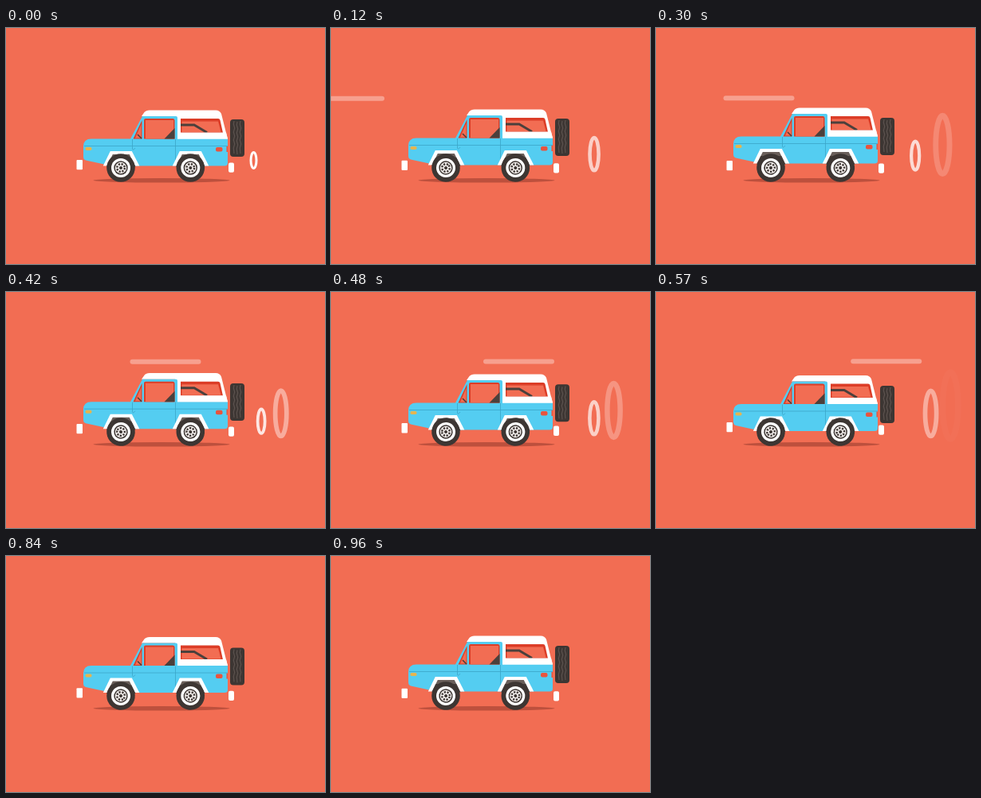
Write an HTML page that moves like this. It is 400x297 px and loops after 0.99 s.

```html
<!DOCTYPE html>
<html>
<head>
<meta charset="utf-8">
<style>
html, body { margin: 0; width: 100%; height: 100%; overflow: hidden; background: #f26d53; }
svg { display: block; width: 100vw; height: 100vh; }
</style>
</head>
<body>
<svg viewBox="0 0 400 297">
  <defs>
    <g id="arch">
      <path fill="#fff" d="M-22.500 173.500L-13.500 155H13.500L23 173.500Z"/>
      <path fill="#6a5f5a" d="M-18 174.500L-10.500 159H10.500L18 174.500Z"/>
      <path fill="#463c38" d="M-18 174.500L-13 164H13L18 174.500Z"/>
    </g>
    <g id="tyre">
      <circle r="17.800" fill="#3d3633"/>
      <circle r="12" fill="#fff"/>
      <circle r="8.700" fill="#3d3633"/>
      <circle r="7.200" fill="#f3efed"/>
      <circle r="4.800" fill="none" stroke="#3d3633" stroke-width="2.400" stroke-dasharray="2.200 1.570"/>
      <circle r="2" fill="#3d3633"/>
    </g>
  </defs>
  <rect width="400" height="297" fill="#f26d53"/>
  <rect id="streak" width="89" height="6" rx="3" fill="#fff" opacity=".35"/>
  <ellipse cx="195" cy="191.800" rx="85.500" ry="2.800" fill="#bd503d"/>
  <g id="rings" fill="none" stroke="#fff"></g>

  <g id="spare">
    <rect x="281" y="115" width="18" height="47" rx="4" fill="#3d3633"/>
    <g fill="none" stroke="#5d534f" stroke-width="1.200">
      <path id="tread" d="M286 117l-.7 4 1.400 5-1.400 5 1.400 5-1.400 5 1.400 5-1.400 5 .7 7"/>
      <use href="#tread" x="4" y="1"/>
      <use href="#tread" x="8"/>
    </g>
  </g>

  <g id="body">
    <path fill="#fff" d="M170 111L173.500 106Q175.500 103.400 180 103.400H263Q268 103.400 270 108L278 140H212V111Z"/>
    <path fill="#54cdf1" d="M97 149Q97 139.500 107 139.500H156L171 111H213Q215 111 215 113V139.500H278V170Q278 173.500 274 173.500H161L123 171.500 100 166.500Q97 165.500 97 162Z"/>
    <path fill="#dc3d27" d="M175 114H209Q211.500 114 211.500 116.500V139.500H173V116Q173 114 175 114ZM170.500 116V139.500H159.500ZM219 114H266Q268 114 268.500 116L272 132H219Z"/>
    <path fill="#f26d53" d="M175 116H210V139.500H175ZM169.500 121V138.500H162ZM220.500 117.500H266L269.500 131H220.500Z"/>
    <path fill="#4b403c" d="M198.500 139.500L211.500 126V139.500Z"/>
    <path fill="none" stroke="#4b403c" stroke-width="3" d="M219 122H236L252 131.500"/>
    <path fill="none" stroke="#4b3b38" stroke-width="1.500" d="M165 134L170 139"/>
    <path fill="#fff" d="M215 131.500H276L278 139.500H215Z"/>
    <path fill="none" stroke="#3ba5c8" stroke-width=".8" d="M98 148.500H278M158.500 140V152Q159 155 162 151M212.500 140V173"/>
    <rect x="99.500" y="150" width="8" height="4" rx="1.700" fill="#e5b550"/>
    <rect x="263" y="150" width="8.500" height="5.500" rx="2" fill="#e9543e"/>
    <rect x="276.500" y="149" width="1.500" height="7" fill="#e9543e"/>
    <use href="#arch" x="144.300"/>
    <use href="#arch" x="231.300"/>
  </g>

  <g id="bumpers" fill="#fff">
    <rect x="88.500" y="166" width="7.500" height="12.300" rx="1"/>
    <rect x="279" y="169.500" width="7" height="12.300" rx="2"/>
  </g>
  <use class="wheel" href="#tyre" data-x="144"/>
  <use class="wheel" href="#tyre" data-x="231.300"/>
</svg>
<script>
const LOOP = 990, STEP = 30;
const times = [0, 120, 300, 420, 570, 720, 960];
const bounce = {
  body: [0, -1, -3, -1.3, 1.5, 0, -3],
  spare: [0, -1, -2, 0, 3, 2.5, -2],
  bumpers: [0, 0.7, 1, 0, -2, -0.6, 0.8]
};
const ringStarts = [0, 210, 361];
const $ = id => document.getElementById(id);
const set = (el, attrs) => { for (const k in attrs) el.setAttribute(k, attrs[k]); };

const rings = ringStarts.map(() =>
  $('rings').appendChild(document.createElementNS('http://www.w3.org/2000/svg', 'ellipse')));

// Smooth curve through the key heights
function heightAt(keys, t) {
  const last = times.length - 1;
  let i = 0;
  while (i < last - 1 && t >= times[i + 1]) i++;
  const slope = k => {
    const a = Math.max(k - 1, 0), b = Math.min(k + 1, last);
    return (keys[b] - keys[a]) / (times[b] - times[a]);
  };
  const span = times[i + 1] - times[i], u = (t - times[i]) / span;
  const ease = u * u * (3 - 2 * u);
  return keys[i] + (keys[i + 1] - keys[i]) * ease
    + span * u * (1 - u) * ((1 - u) * slope(i) - u * slope(i + 1));
}

function drawRing(ring, age) {
  const d = age * 0.163, width = 3 + d * 0.08;
  const alive = age >= -20 && d < 60;
  set(ring, {
    cx: 310.5 + d, cy: 166.5 - d * 0.4,
    rx: Math.max(0, 5 + d * 0.145 - width / 2),
    ry: Math.max(0, 11.5 + d * 0.585 - width / 2),
    'stroke-width': width,
    opacity: alive ? Math.min(1, 1 - d / 60) : 0
  });
}

function draw(now) {
  const t = Math.floor(now % LOOP / STEP) * STEP;
  for (const id in bounce) set($(id), { transform: `translate(0 ${heightAt(bounce[id], t)})` });
  set($('streak'), { x: 84.5 + (t - 300) * 0.5915, y: 86.2 - t * 0.0034 });
  rings.forEach((ring, i) => drawRing(ring, t - ringStarts[i]));
  document.querySelectorAll('.wheel').forEach(wheel =>
    set(wheel, { transform: `translate(${wheel.dataset.x} 176) rotate(${-t / LOOP * 360})` }));
}

const start = performance.now();
function tick() {
  draw(performance.now() - start);
  requestAnimationFrame(tick);
}
tick();
</script>
</body>
</html>
```
